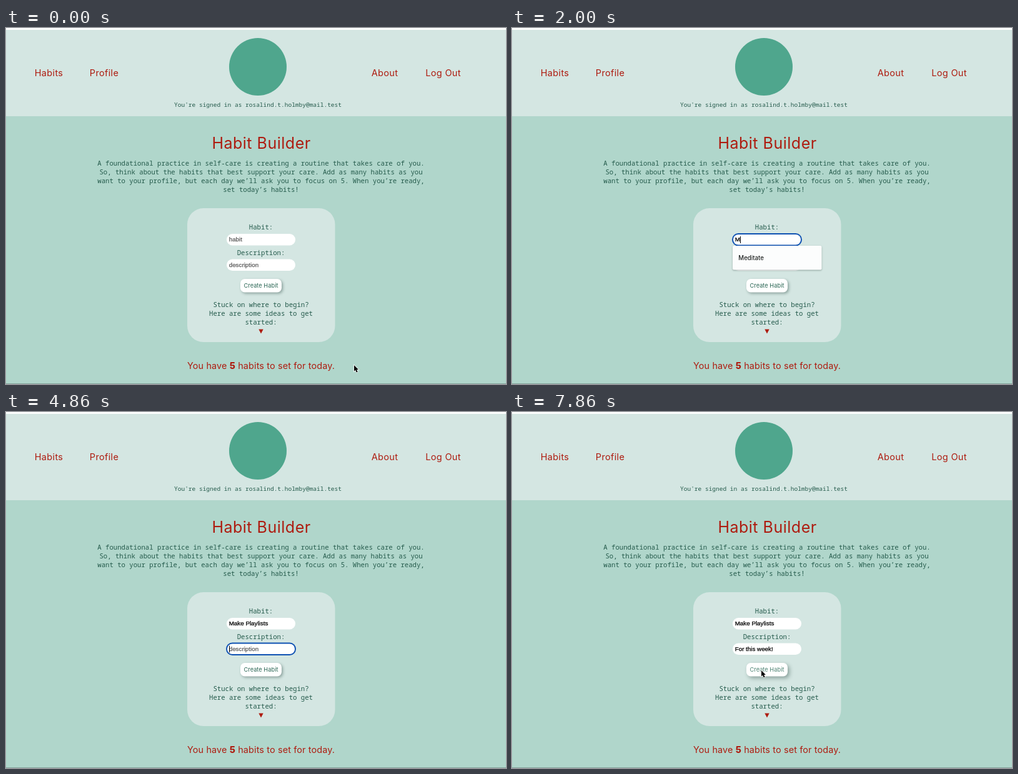
An HTML page with a canvas that plays this animation: 800 px wide and 569 px high, repeating every 8000 ms.

```html
<!DOCTYPE html>
<html lang="en">
<head>
<meta charset="utf-8">
<title>Habit Builder</title>
<style>
html, body { margin: 0; width: 100%; height: 100%; overflow: hidden; background: #b0d6cb; }
canvas { display: block; width: 800px; height: 569px; }
</style>
</head>
<body>
<canvas id="stage"></canvas>
<script>
const W = 800, H = 569, LOOP = 8000, RATE = 7 / 1000;
const canvas = document.getElementById('stage');
const ctx = canvas.getContext('2d');
const dpr = window.devicePixelRatio || 1;
canvas.width = W * dpr;
canvas.height = H * dpr;

const RED = '#ae1c10', GREEN = '#255b4c', PALE = '#d4e6e2', MINT = '#b0d6cb';
const SANS = 'Inter, sans-serif';
const MONO = '"Noto Sans Mono", monospace';
const FIELD = '"Liberation Sans", Arial, sans-serif';

// All times below are in ticks of 1/7 second.
const OPEN = 9, NEXT = 33, BLUR = 54;
const habit = {
  y: 329, hint: 'habit', text: 'Make Playlists', from: OPEN, to: NEXT,
  keys: [12, 16, 17, 18, 19, 21, 22, 23, 24, 26, 27, 28, 29, 30]
};
const detail = {
  y: 369.5, hint: 'description', text: 'For this week!', from: NEXT, to: BLUR,
  keys: [35, 36, 37, 38, 39, 40, 40, 41, 42, 42, 43, 44, 45, 46]
};
const ideas = ['1', 'sleep', 'testing adding', 'testing mvp', 'test 1', 'tolly matey'];
const intro = [
  'A foundational practice in self-care is creating a routine that takes care of you.',
  'So, think about the habits that best support your care. Add as many habits as you',
  'want to your profile, but each day we’ll ask you to focus on 5. When you’re ready,',
  'set today’s habits!'
];
const arrive = [[0, 557, 539], [1, 548, 531], [3, 508, 478], [4, 452, 402], [5, 412, 350], [7, 402, 341]];
const leave = [[49, 403, 345], [50, 403, 358], [51, 402, 378], [52, 400, 399], [53, 399, 411], [54, 399, 413]];

function box(x, y, w, h, r, fill) {
  ctx.beginPath();
  ctx.roundRect(x, y, w, h, r);
  ctx.fillStyle = fill;
  ctx.fill();
}

function shadow(color, blur, x, y) {
  ctx.shadowColor = color;
  ctx.shadowBlur = blur * dpr;
  ctx.shadowOffsetX = x * dpr;
  ctx.shadowOffsetY = y * dpr;
}

// Returns the advance width; a heft above 0 thickens the strokes.
function label(str, x, y, font, color, align = 'center', gap = 0, heft = 0) {
  ctx.font = font;
  ctx.fillStyle = ctx.strokeStyle = color;
  ctx.textAlign = align;
  ctx.letterSpacing = gap + 'px';
  ctx.fillText(str, x, y);
  if (heft) {
    ctx.lineWidth = heft;
    ctx.strokeText(str, x, y);
  }
  const width = ctx.measureText(str).width;
  ctx.letterSpacing = '0px';
  return width;
}

const mono = (str, y) => label(str, 408, y, `10.65px ${MONO}`, GREEN);

function header() {
  ctx.fillStyle = MINT;
  ctx.fillRect(0, 0, W, H);
  ctx.fillStyle = PALE;
  ctx.fillRect(0, 0, W, 141);
  ctx.fillStyle = '#fdfefe';
  ctx.fillRect(0, 0, W, 3);
  ctx.fillStyle = '#83a099';
  ctx.fillRect(0, 568, W, 1);

  const links = [['Habits', 68.5], ['Profile', 157], ['About', 606], ['Log Out', 699.5]];
  for (const [name, x] of links) label(name, x, 77, `14.5px ${SANS}`, RED, 'center', 0.35);

  ctx.beginPath();
  ctx.arc(403, 62, 46, 0, Math.PI * 2);
  ctx.fillStyle = '#4fa68d';
  ctx.fill();
  label("You're signed in as rosalind.t.holmby@mail.test", 403, 126.3, `9.5px ${MONO}`, GREEN);
}

function page(hover) {
  label('Habit Builder', 408.5, 193, `25px ${SANS}`, RED, 'center', 0.5);
  intro.forEach((line, i) => mono(line, 220.3 + i * 14));

  box(290, 288, 236.5, 214, 26, PALE);
  mono('Habit:', 322.3);
  mono('Description:', 362.5);

  ctx.save();
  shadow('rgba(40,70,62,.42)', hover ? 6 : 4, hover ? 3 : 2, hover ? 3 : 2);
  box(375, 401, 66, 21.5, 7, '#fff');
  ctx.restore();
  label('Create Habit', 408, 415, `9.2px ${SANS}`, hover ? '#4d8373' : '#2a6654', 'center', 0.05);

  ['Stuck on where to begin?', 'Here are some ideas to get', 'started:']
    .forEach((line, i) => mono(line, 445.6 + i * 14));
  ctx.beginPath();
  ctx.moveTo(404.3, 481.5);
  ctx.lineTo(411.7, 481.5);
  ctx.lineTo(408, 488.5);
  ctx.fillStyle = RED;
  ctx.fill();

  const size = '14.4px ' + SANS;
  let x = 290;
  const add = (str, weight) => x += label(str, x, 545, `${weight} ${size}`, RED, 'left', 0.14);
  add('You have ', 400);
  add('5', 800);
  add(' habits to set for today.', 400);
}

function field(f, tick) {
  const focused = tick >= f.from && tick < f.to;
  const count = f.keys.filter(k => k <= tick).length;
  if (focused) box(352, f.y - 1, 112, 20.5, 10.2, '#0d50b2');
  const inset = focused ? 0.9 : 0;
  box(353 + inset, f.y + inset, 110 - 2 * inset, 18.5 - 2 * inset, 9.2, '#fff');

  const typed = f.text.slice(0, count);
  const width = label(typed || f.hint, 356.7, f.y + 12.4, `9.8px ${FIELD}`,
    typed ? '#000' : '#5c5c5c', 'left', 0, 0.25);
  const since = tick - (count ? f.keys[count - 1] : f.from);
  if (focused && since % 7 < 4) {
    ctx.fillStyle = '#000';
    ctx.fillRect(Math.round(356.7 + (typed ? width : 0)), f.y + 4, 1, 11);
  }
}

function menu(items) {
  const h = items.length * 26.6 + 12;
  ctx.save();
  shadow('rgba(30,50,45,.4)', 2.5, 0, 1);
  box(353, 348, 142.5, h, 2, '#fcfdfd');
  ctx.restore();
  items.forEach((item, i) =>
    label(item, 362.3, 371 + i * 26.6, `500 9.7px ${SANS}`, '#202322', 'left'));
}

function pathAt(path, tick) {
  return path.findLast(p => p[0] <= tick).slice(1);
}

function arrow(x, y) {
  ctx.beginPath();
  [[0, 0], [0, 9.6], [2.2, 7.7], [3.8, 11.4], [5.6, 10.6], [4.1, 7.1], [6.9, 7]]
    .forEach(([dx, dy]) => ctx.lineTo(x + dx, y + dy));
  ctx.closePath();
  ctx.strokeStyle = '#fff';
  ctx.lineWidth = 1.4;
  ctx.stroke();
  ctx.fillStyle = '#000';
  ctx.fill();
}

function beam(x, y) {
  ctx.beginPath();
  for (const s of [-1, 1]) {
    ctx.moveTo(x - 2, y + s * 5.5);
    ctx.quadraticCurveTo(x, y + s * 5.5, x, y + s * 4);
    ctx.quadraticCurveTo(x, y + s * 5.5, x + 2, y + s * 5.5);
  }
  ctx.moveTo(x, y - 4.5);
  ctx.lineTo(x, y + 4.5);
  ctx.moveTo(x - 1.3, y + 1.8);
  ctx.lineTo(x + 1.3, y + 1.8);
  ctx.strokeStyle = '#222';
  ctx.lineWidth = 1;
  ctx.stroke();
}

function pointer(tick) {
  if (tick >= 12 && tick < 49) return;
  const [x, y] = pathAt(tick < 12 ? arrive : leave, tick);
  const overField = [habit, detail].some(f => x > 353 && x < 463 && y >= f.y && y <= f.y + 19);
  (overField ? beam : arrow)(x, y);
}

function draw(ms) {
  const tick = Math.floor((ms % LOOP + 5) * RATE) % 56;
  ctx.setTransform(dpr, 0, 0, dpr, 0, 0);
  header();
  page(tick >= 53);
  field(habit, tick);
  field(detail, tick);
  if (tick >= OPEN && tick < 12) menu(ideas);
  else if (tick >= 12 && tick < 16) menu(['Meditate']);
  pointer(tick);
}

const start = performance.now();
function loop() {
  draw(performance.now() - start);
  requestAnimationFrame(loop);
}
loop();
</script>
</body>
</html>
```
